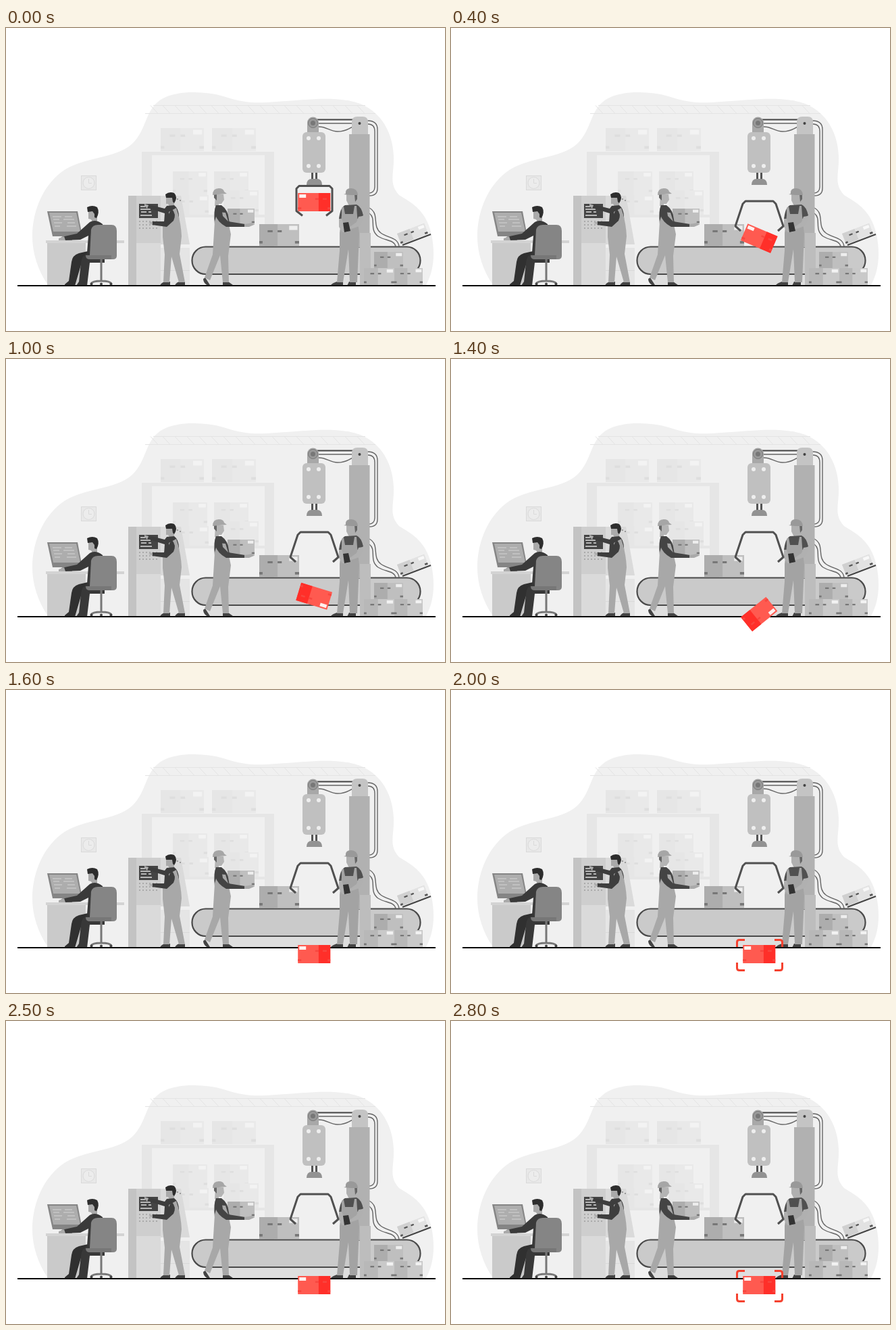
Write an HTML page that moves like this. It is 650 px wide and 448 px high and loops after 2.9 s.

```html
<!DOCTYPE html>
<html lang="en">
<head>
<meta charset="utf-8">
<title>Dropped parcel</title>
<style>
html, body { margin: 0; width: 100%; height: 100%; overflow: hidden; background: #fff; }
svg { display: block; width: 100vw; height: 100vh; }
</style>
</head>
<body>
<svg viewBox="0 0 650 448" fill="none">
  <path fill="#f0f0f0" d="M62 380C46 356 38 330 39 302C41 266 56 233 82 213C115 189 160 195 187 171C209 150 205 122 229 106C249 93 290 92 322 101C350 110 365 112 400 109C440 107 470 102 505 107C550 113 573 150 574 190C575 215 566 230 582 247C602 259 622 270 630 305C636 335 633 360 622 380Z"/>
  <g id="truss" stroke="#e4e4e4"><path d="M218 114.500H532M206 126.500H547"/></g>

  <g id="shelf"><path fill="#e6e6e6" d="M201 183H397V380H383V188H216V380H201Z"/></g>

  <g stroke="#dadada"><rect x="111.500" y="218.500" width="22" height="21" fill="#e8e8e8"/><circle cx="122.500" cy="229" r="8.500" fill="#ececec"/><path d="M122.500 223V229.500H127"/></g>

  <!-- desk and monitor -->
  <path fill="#cacaca" d="M61 318H118V380H61Z"/>
  <path fill="#d3d3d3" d="M59 314H175V318H59Z"/>
  <path fill="#8b8b8b" d="M85 305H96L98 314H83Z"/>
  <path fill="#858585" d="M61 271H106L113 308H69Z"/>
  <path fill="#adadad" d="M64 273H104L110 301H70Z"/>
  <path stroke="#d4d4d4" d="M69 279H82M87 279H98M70 283H79M85 283H101M71 288H83M91 288H102M72 293H80M90 293H104"/>

  <!-- control cabinet -->
  <path fill="#e5e5e5" d="M207 325H272V380H207Z"/>
  <path stroke="#d9d9d9" d="M207.500 380V358.500H272"/>
  <path fill="#dadada" d="M193 248H259L272 320H229V380H193Z"/>
  <path fill="#c3c3c3" d="M181 248H193V380H181Z"/>
  <path fill="#cecece" d="M193 248H229V318H193Z"/>
  <path fill="#444" d="M197 260H225V281H197Z"/>
  <path stroke="#ddd" stroke-width="1.300" d="M199 264H206M209 263H215M199 268H214M200 272H208M211 272H215M199 277H216"/>
  <g id="keys"/>
  <path fill="#999" d="M249 252h2v2h-2zM253 252h2v2h-2zM257 254h2v2h-2z"/>

  <!-- conveyor -->
  <path fill="#dedede" d="M297 364H592V380H297Z"/>
  <rect x="275.500" y="323.500" width="338" height="40.500" rx="20" fill="#cacaca" stroke="#4a4a4a" stroke-width="2.200"/>

  <!-- robot arm -->
  <g stroke="#666" stroke-width="1.400">
    <path stroke="#444" stroke-width="2" d="M460 135.500H514"/>
    <path d="M462 141H514M462 146C474 145 479 153 491 153S506 149 514 146M535 137C546 137 550 142 550 150V237C550 245 545 248 538 248M536 142C543 142 546 146 546 153V235C546 241 542 244 538 244M538 266C554 275 541 292 555 303C566 311 580 309 582 323M538 274C549 282 537 298 551 308C562 315 575 313 577 323"/>
  </g>
  <path fill="#b1b1b1" d="M508 157H538.500V324H508Z"/>
  <path fill="#c4c4c4" d="M512 139Q512 131 520 131H528Q536 131 536 139V157H512Z"/>
  <path fill="#bdbdbd" d="M524 303H540V380H524Z"/>
  <circle cx="523.500" cy="141" r="2" fill="#444"/>
  <path fill="#a8a8a8" d="M446 140A8.500 8.500 0 0 1 463 140V157H446Z"/>
  <circle cx="454.500" cy="140.500" r="7" fill="#999" stroke="#777"/><circle cx="454.500" cy="140.500" r="3.500" fill="#777"/>
  <rect x="439" y="154" width="34" height="60" rx="6" fill="#c0c0c0"/>
  <g fill="#eee"><circle cx="448" cy="163" r="3"/><circle cx="463" cy="163" r="3"/><circle cx="448" cy="204" r="3"/><circle cx="463" cy="204" r="3"/></g>
  <path stroke="#555" stroke-width="3" d="M453.500 214V224M459.500 214V224"/>
  <path fill="#929292" d="M445 232Q445 223 453 223H460Q468 223 468 232Z"/>

  <g id="boxes"/>
  <path stroke="#444" stroke-width="2" d="M587 321L629 305"/>

  <!-- operator at the desk -->
  <path fill="#303030" d="M130 328L108 333Q98 336 97 346L93 374L87 379V381H102L112 347L130 344Z"/>
  <path fill="#383838" d="M146 332H122Q112 336 111 347L108 375L104 381H120L124 347H146Z"/>
  <path fill="#aaa" d="M122 270H135V285L130 290L126 283L122 282Z"/>
  <path fill="#2d2d2d" d="M120 265Q128 261 135 265Q139 272 134 281L131 280V275L128 271L121 272Z"/>
  <path fill="#3a3a3a" d="M124 287Q133 282 143 290Q150 309 147 332H120L122 307L110 313L84 314L82 309L105 304Z"/>
  <path fill="#aaa" d="M86 308L78 311V314H88Z"/>
  <path fill="#858585" d="M126 298Q128 291 136 291H156Q164 291 164 300V337Q164 342 158 342H130Q124 342 124 336Z"/>
  <path fill="#777" d="M118 336H156V342H124Q118 342 118 336Z"/>
  <path stroke="#777" stroke-width="3" d="M141 342V373M126 378Q128 374 141 374T156 378"/>
  <g fill="#444"><circle cx="126.500" cy="378.500" r="2"/><circle cx="141" cy="378.500" r="2"/><circle cx="155.500" cy="378.500" r="2"/></g>

  <!-- operator at the cabinet -->
  <path fill="#444" d="M235 375H243V381H228Q229 377 235 375ZM257 375H265V381H250Q251 377 257 375Z"/>
  <path fill="#aaa" d="M237 250H249V263L244 267L240 260H237Z"/>
  <path fill="#2d2d2d" d="M236 246Q242 241 249 244Q255 250 249 259L247 257L246 251L237 251Z"/>
  <path fill="#3d3d3d" d="M238 263L249 262Q257 268 256 284L234 288L235 274L209 266L211 261L235 267Z"/>
  <path fill="#a8a8a8" d="M241 272L252 266Q259 286 260 308L257 334L265 376H256L245 338L242 376H233L235 335L232 309V291L241 282Z"/>
  <path fill="#3d3d3d" d="M245 267Q253 275 248 285L238 294L216 291V286L234 286L239 279Z"/>
  <path fill="#aaa" d="M211 262L205 260V263L209 267ZM217 286L211 288L217 291Z"/>

  <!-- carrier -->
  <path fill="#444" d="M295 369L302 380L299 381Q292 377 292 371ZM321 375H329L336 380V381H321Z"/>
  <path fill="#b4b4b4" d="M310 246H322L323 254L319 260H315V266L309 263Z"/>
  <path fill="#666" d="M308 251V245H312V255Z"/>
  <path fill="#a6a6a6" d="M306 247Q306 237 315 237Q322 237 323 242L327 245L315 246Z"/>
  <path fill="#444" d="M311 262H319Q329 269 330 283L331 290H309Q307 270 311 262Z"/>
  <path fill="#a8a8a8" d="M309 286L313 272L325 273L329 286L333 305L329 337L330 376H321L317 336L302 373L294 369L306 335Z"/>
  <path fill="#444" d="M312 264Q320 266 321 278L329 286L354 290V294L326 294Q313 287 310 276Z"/>
  <path fill="#aaa" d="M353 290L365 288L367 291L360 294H353Z"/>

  <!-- inspector -->
  <path fill="#444" d="M490 375H499V381H480Q483 377 490 375ZM508 375H518V381H505Z"/>
  <path fill="#b0b0b0" d="M504 246H518V260L514 266L507 261L504 255Z"/>
  <path fill="#666" d="M516 246H520V253L517 257Z"/>
  <path fill="#999" d="M503 245Q502 237 511 237Q520 237 521 247L510 247L500 246Z"/>
  <path fill="#505050" d="M502 262L519 261Q526 264 529 277L522 282H493Q495 265 502 262Z"/>
  <path fill="#a3a3a3" d="M500 264L502 275H514L516 263H519L520 278L523 304L520 376H509L507 327L499 376H490L494 329V303L497 277V266Z"/>
  <path fill="#b0b0b0" d="M522 279L528 278Q529 289 523 293L509 298V294L519 287ZM493 282H497L501 293L506 297V302H498L493 294Z"/>
  <path fill="#333" d="M499 288L507 287L510 300L501 302Z"/>

  <path stroke="#000" stroke-width="2" d="M17 381H636"/>
  <path id="claw" stroke="#505050" stroke-width="3" stroke-linejoin="round"/>
  <g id="parcel"/>
  <path id="focus" stroke="#f5422f" stroke-width="3" d="M423.500 380V373Q423.500 369.500 427 369.500H435M479 369.500H487Q490.500 369.500 490.500 373V380M490.500 403V411Q490.500 414.500 487 414.500H479M435 414.500H427Q423.500 414.500 423.500 411V403"/>
</svg>
<script>
const $ = id => document.getElementById(id);
const rect = (x, y, w, h, fill) => `<rect x="${x}" y="${y}" width="${w}" height="${h}" fill="${fill}"/>`;

// Carton with a darker left side, a label and tape marks.
function carton(x, y, w, h, [side, front, label, tape], move = '', split = .46) {
  const s = w * split, u = w / 48;
  return `<g transform="translate(${x} ${y}) ${move}">` +
    rect(0, 0, w, h, front) + rect(0, 0, s, h, side) +
    rect(w - 12 * u, 2 * u, 10 * u, 5 * u, label) +
    rect(s - 12 * u, h * .28, 6 * u, 2.5 * u, tape) + rect(s, h * .28, 5 * u, 2.5 * u, tape) +
    rect(0, h * .78, 4 * u, 3 * u, tape) + rect(w - 5 * u, h * .78, 5 * u, 3 * u, tape) + '</g>';
}

const pale = ['#e6e6e6', '#e9e9e9', '#f3f3f3', '#dedede'];
const gray = ['#adadad', '#bfbfbf', '#eee', '#777'];
const light = ['#b8b8b8', '#c9c9c9', '#f2f2f2', '#777'];
const red = ['#ff2f29', '#ff5a50', '#fff0ee', '#f8463f'];

for (let x = 214; x < 532; x += 18)
  $('truss').innerHTML += `<path d="M${x} 114.500l11 12"/>`;
for (let i = 0; i < 18; i++)
  $('keys').innerHTML += rect(197 + i % 6 * 5, 285 + Math.floor(i / 6) * 5, 2, 2, '#aaa');

const stack = (list, tone) => list.map(b => carton(...b, tone)).join('');
$('shelf').innerHTML += stack([[229, 148, 64, 34], [305, 148, 65, 34], [247, 212, 51, 35],
  [308, 212, 51, 35], [247, 247, 53, 29], [322, 240, 52, 36]], pale) + rect(216, 276, 167, 4, '#e6e6e6');
$('boxes').innerHTML =
  stack([[375, 290, 59, 32], [328, 267, 40, 24], [545, 331, 43, 24]], gray) +
  stack([[530, 355, 45, 25], [575, 355, 42, 25]], light) +
  carton(579, 304, 43, 17, ['#d0d0d0', '#e2e2e2', '#f8f8f8', '#555'], 'rotate(-21)');
$('parcel').innerHTML = carton(24, -13.5, 48, 27, red, 'scale(-1 1)', .36);

// Claw: k is how far it is open, y its top.
function clawPath(k, y) {
  const out = 430 - 9 * k, tip = 439 - 10 * k, top = 430 + 2 * k;
  const m = x => 913 - x;
  return `M${tip} ${y + 44}L${out} ${y + 37}L${top} ${y + 4}L${top + 4} ${y}` +
    `H${m(top + 4)}L${m(top)} ${y + 4}L${m(out)} ${y + 37}L${m(tip)} ${y + 44}`;
}

const STEP = 200, LOOP = 2900;
const turns = [0, 0, 23, 83, 149, 197, 225, 141, 0];

function draw(ms) {
  const t = ms % LOOP, n = Math.min(8, Math.floor(t / STEP));
  const falling = n > 1;
  const y = falling ? 311 + (n - 2) * 13.25 : 257.5 + n * 23;
  $('parcel').setAttribute('transform', `translate(456.200 ${y}) rotate(${turns[n]})`);
  $('claw').setAttribute('d', clawPath(Math.min(n, 2) / 2, n ? 256 : 233.5));
  const lit = t >= 1800 && Math.floor(t / 100) % 2 === 0;
  $('focus').setAttribute('visibility', lit ? 'visible' : 'hidden');
}

function tick() {
  draw(performance.now());
  requestAnimationFrame(tick);
}
tick();
</script>
</body>
</html>
```
